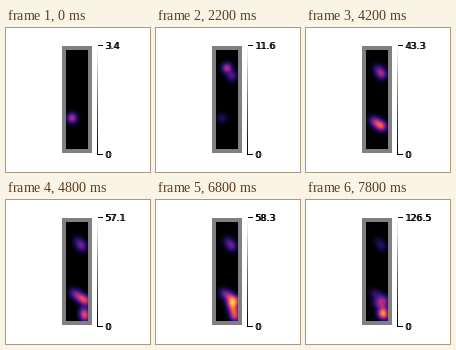
Write a matplotlib script that moves like this. It is 144 px wide and 144 px high and loops after 8000 ms.

```python
import numpy as np
import matplotlib.pyplot as plt
from matplotlib.animation import FuncAnimation
from matplotlib.colors import LinearSegmentedColormap
from matplotlib.patches import Rectangle

SIZE, DPI, STEP, LOOP = 144, 100, 200, 8000
LEFT, RIGHT, TOP, BOTTOM = 60, 82, 22, 121
SPREAD, SHARE, MAX_DEPOSIT = 3.5, 0.42, 20

heat = LinearSegmentedColormap.from_list(
    "heat", ["#000000", "#23106a", "#6c1a8c", "#b52f80",
             "#ee5a48", "#ff9a35", "#ffdc78", "#ffffff"])

# Key points of the walk: arrival ms, steps taken, x, y, scale maximum
VISITS = [
    (0, 1, 66, 90, 3.4),
    (800, 1, 76, 48, 6.2),
    (1000, 1, 71, 40, 11.6),
    (2600, 2, 76, 46, 24.9),
    (3800, 1, 68, 93, 24.9),
    (4400, 3, 80, 101, 57.1),
    (4600, 1, 79, 117, 57.1),
    (5000, 2, 77, 107, 57.1),
    (5200, 1, 75, 103, 58.3),
    (7000, 1, 71, 103, 58.3),
    (7200, 1, 76, 113, 80.5),
    (7600, 2, 77, 114, 126.5),
]


def walk():
    """Yield time, x, y and scale maximum for every step."""
    _, _, x0, y0, peak0 = VISITS[0]
    for arrival, steps, x, y, peak in VISITS:
        for i in range(1, steps + 1):
            t = i / steps
            yield (arrival - (steps - i) * STEP,
                   x0 + (x - x0) * t, y0 + (y - y0) * t,
                   peak0 * (peak / peak0) ** t)
        x0, y0, peak0 = x, y, peak


path = list(walk())
yy, xx = np.mgrid[TOP:BOTTOM, LEFT:RIGHT] + 0.5


def heat_at(ms):
    """Return the accumulated map, scaled to 0..1, and its scale maximum."""
    total = np.zeros(xx.shape)
    for start, x, y, level in path:
        if start <= ms:
            peak = level
            distance = np.hypot(xx - x, yy - y) / SPREAD
            total += min(SHARE * peak, MAX_DEPOSIT) * np.exp(-distance ** 2 / 2)
    return total / peak, peak


def block(x, y, w, h, color):
    ax.add_patch(Rectangle((x, y), w, h, fc=color, lw=0, antialiased=False))


def show_map(data, left, right, top, bottom):
    return ax.imshow(data, cmap=heat, vmin=0, vmax=1, zorder=2,
                     extent=(left, right, bottom, top),
                     interpolation="nearest")


def bold_label(y):
    """Struck twice, one pixel apart."""
    return [ax.text(x, y, "0", family="DejaVu Sans", size=9.5 * 72 / DPI,
                    va="center_baseline", color="black") for x in (98.5, 99.5)]


fig = plt.figure(figsize=(SIZE / DPI, SIZE / DPI), dpi=DPI, facecolor="white")
ax = fig.add_axes([0, 0, 1, 1])
ax.axis("off")

block(56, 18, 30, 107, "#808080")
for tick in (17, 126):
    block(92, tick, 5, 1, "black")
show_map(np.linspace(1, 0, 110)[:, None], 91, 92, 17, 127)
image = show_map(heat_at(0)[0], LEFT, RIGHT, TOP, BOTTOM)
ax.set(xlim=(0, SIZE), ylim=(SIZE, 0), aspect="auto")
maximum = bold_label(17.5)
bold_label(126.5)


def draw(frame):
    data, peak = heat_at(frame * STEP)
    image.set_data(data)
    for text in maximum:
        text.set_text(f"{peak:.1f}")
    return [image, *maximum]


animation = FuncAnimation(fig, draw, frames=LOOP // STEP, interval=STEP,
                          repeat=True, repeat_delay=0)
plt.show()
```
